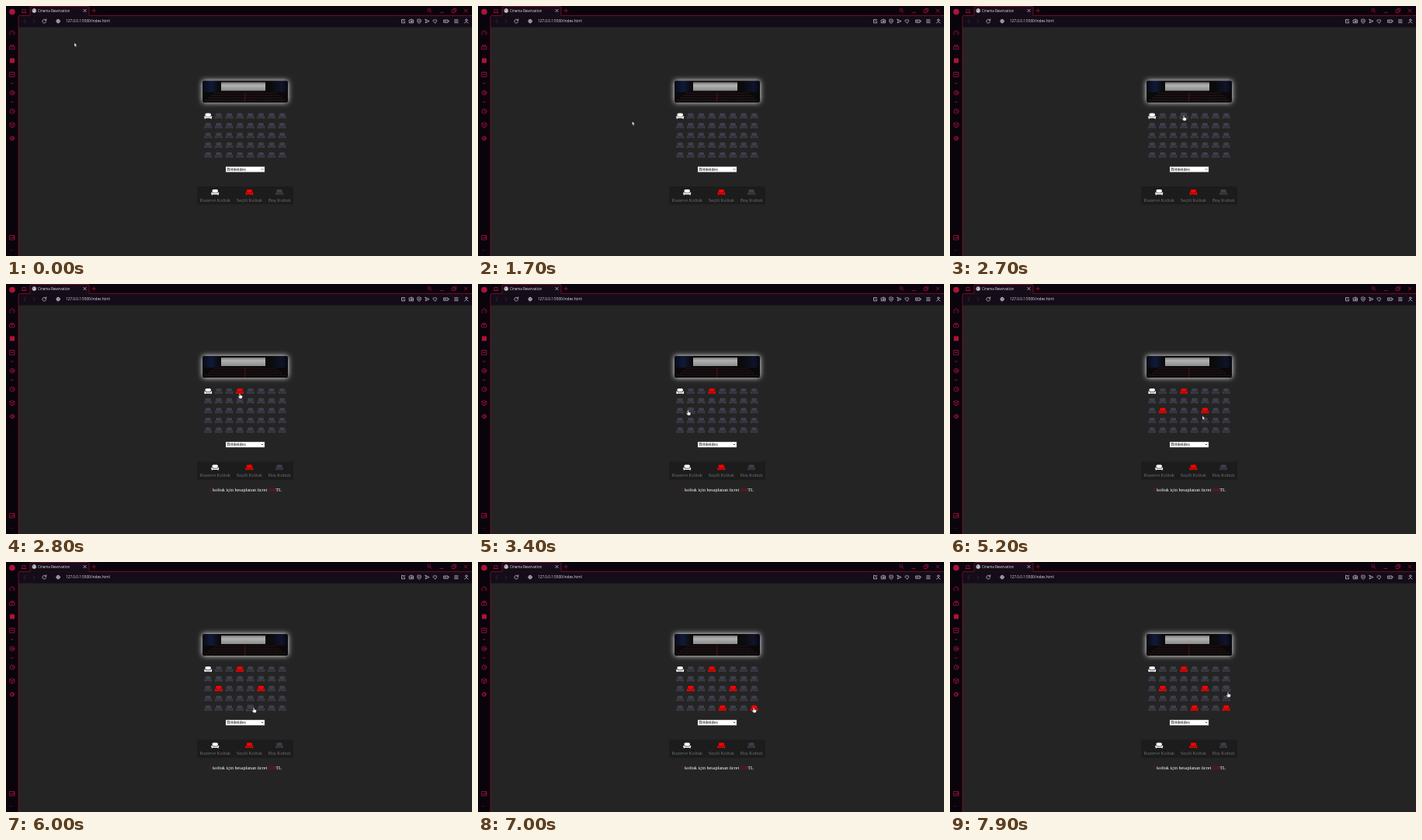
These frames come from a looping animation (600x323 px, 8 s). An HTML page:

```html
<!DOCTYPE html>
<html lang="tr">
<head>
<meta charset="utf-8">
<title>Cinema Reservation</title>
<style>
html, body { margin: 0; height: 100%; overflow: hidden; background: #242424; }
svg { display: block; width: 100vw; height: 100vh; }
.ui { font-family: "Open Sans", "Noto Sans", sans-serif; fill: #e4e0e6; }
.serif { font-family: "Liberation Serif", "Times New Roman", serif; font-size: 6.25px; }
.line { fill: none; stroke-width: .8; stroke-linecap: round; stroke-linejoin: round; }
</style>
</head>
<body>
<svg viewBox="0 0 600 323">
  <defs>
    <path id="seat" d="M-3.7-.7V-2Q-3.7-3.6-2.1-3.6H2.1Q3.7-3.6 3.7-2V-.7Q2.8-.4 2.8.8H-2.8Q-2.8-.4-3.7-.7ZM-5.2.9A1.1 1.1 0 0 1-3.3.5V1.5H3.3V.5A1.1 1.1 0 0 1 5.2.9L4.6 2V3.6H3.3V3H-3.3V3.6H-4.6V2Z"/>
    <filter id="glow" x="-20%" y="-70%" width="140%" height="240%"><feGaussianBlur stdDeviation="3.6"/></filter>
    <linearGradient id="beam" x2="0" y2="1">
      <stop stop-color="#777"/><stop offset=".35" stop-color="#b2b2b2"/><stop offset="1" stop-color="#8c8c8c"/>
    </linearGradient>
    <linearGradient id="wall">
      <stop stop-color="#080a14"/><stop offset=".1" stop-color="#101a38"/><stop offset=".2" stop-color="#0b0a0c"/>
      <stop offset=".8" stop-color="#0b0a0c"/><stop offset=".93" stop-color="#10142a"/><stop offset="1" stop-color="#080810"/>
    </linearGradient>
  </defs>

  <rect width="600" height="323" fill="#242424"/>
  <rect width="600" height="12.5" fill="#09040c"/>
  <rect width="16" height="323" fill="#09040c"/>
  <rect x="16" y="12.5" width="584" height="15" fill="#140c18"/>
  <path d="M31 12V2Q31 .5 32.5.5H105.500Q107 .5 107 2V12" fill="#160c19"/>
  <path class="line" stroke="#8a0f2c" d="M16 323V14Q16 12.300 18 12.300H31V2Q31 .5 32.500.5H105.500Q107 .5 107 2V12.300H600"/>

  <g class="ui">
    <text x="41" y="7.800" font-size="4.450">Cinema Reservation</text>
    <text x="77" y="21.300" font-size="4.700">127.0.0.1:5500/index.html</text>
  </g>

  <!-- tab strip and sidebar -->
  <circle cx="8" cy="7.500" r="3.800" fill="#b0123a"/>
  <rect x="5" y="67.500" width="6" height="6" fill="#b0123a"/>
  <g class="line" stroke="#a51236">
    <path d="M21 8V4.500H25V8ZM20 8.500H26M111 6H115.500M113.250 3.750V8.250"/>
    <circle cx="544.700" cy="5.200" r="1.900"/>
    <path d="M546.200 6.700 548 8.500M559 8.500H563M574.500 5H578V8.500H574.500ZM576 5V3.500H579.500V7H578M590 4 594 8M594 4 590 8"/>
    <path d="M5.800 37.600A3.200 3.200 0 1 1 10.200 37.600M8 35.500 9.800 33.800M5 52H11V56H5ZM6.500 52V50.500H9.500V52M8 53V55"/>
    <path d="M5 85.500H11V91.500H5ZM6.500 88.500H9.500M6.800 87H7M9 87H9.200M6.500 100H9.500M6.500 124H9.500"/>
    <circle cx="8" cy="112" r="3"/><circle cx="8" cy="112" r="1.200"/>
    <circle cx="8" cy="136" r="3"/><path d="M8 134V136L9.500 137"/>
    <path d="M8 150.500 11 152V155.500L8 157 5 155.500V152ZM5 152 8 153.500 11 152M8 153.500V157"/>
    <circle cx="8" cy="171" r="2.500" stroke-width="1.300" stroke-dasharray="1.300 .660" stroke-linecap="butt"/><circle cx="8" cy="171" r="1.500"/>
    <path d="M5 296.500H11V302H5ZM5.500 301 7.500 299 9 300.500"/><circle cx="9.500" cy="299" r=".9"/>
    <path d="M5.500 315.500H10.500" stroke-dasharray=".1 2.400"/>
  </g>

  <!-- address bar -->
  <g class="line" stroke="#3c3341"><path d="M25 17.500 23 19.700 25 22M35 17.500 37 19.700 35 22"/></g>
  <g class="line" stroke="#c4bec8" stroke-width=".7">
    <path d="M99.800 4.300 103.200 7.700M103.200 4.300 99.800 7.700M51.300 18.300A2.400 2.400 0 1 0 51.700 20M51.800 16.800V18.600H50"/>
    <circle cx="67.200" cy="19.600" r="2.300"/><path d="M65 19.600H69.400M67.200 17.300Q65 19.600 67.200 21.900Q69.400 19.600 67.200 17.300"/>
    <path d="M512 17.500H509.500V21.800H513.500V20M511.500 19.800 513.800 17.300M519.500 18H520.500L521 17.200H523L523.500 18H524.500V21.800H519.500Z"/>
    <circle cx="522" cy="19.800" r="1"/>
    <path d="M532 17 534.200 17.800V20Q534 21.500 532 22.300Q530 21.500 529.800 20V17.800ZM531.200 19.500H532.800M540 17.400 545 19.600 540 21.800 541 19.600Z"/>
    <path d="M552.300 22 550.200 19.800Q549.500 18.200 550.800 17.600Q551.900 17.400 552.300 18.500Q552.700 17.400 553.800 17.600Q555.100 18.200 554.400 19.800Z"/>
    <path d="M564 18H569V21.300H564ZM565 19.700H566.500M570 19V20.300M577.500 17.800H582M577.500 19.700H582M577.500 21.600H582"/>
    <circle cx="592.700" cy="18.200" r="1.200"/><path d="M590.600 22Q592.700 18.500 594.800 22"/>
  </g>
  <circle cx="36.300" cy="6" r="2.700" fill="#eee"/>
  <path d="M34.300 4.700Q36 4.300 35.700 5.700T34.700 7M37 3.900Q36.500 5 38.300 5.400M36.700 7.700 37.900 6.600" class="line" stroke="#333"/>

  <g id="page">
    <rect x="253" y="93" width="110" height="28" rx="2" fill="#fff" filter="url(#glow)"/>
    <rect x="253" y="93" width="110" height="28" rx="2" fill="url(#wall)"/>
    <path d="M277 95H334V106H277Z" fill="url(#beam)"/>
    <path d="M254 108H362V121H254Z" fill="#0b0809"/>
    <g id="rows" fill="none"></g>
    <path d="M308 109 307.500 121" stroke="#4b1014" stroke-width="1.200"/>
    <g id="seats"></g>
    <rect x="283" y="204" width="50" height="7" fill="#fff" stroke="#777" stroke-width=".4"/>
    <text x="284.800" y="209.300" font-size="5.150" font-family="Liberation Sans, Arial, sans-serif" fill="#111">Brittletides</text>
    <path class="line" stroke="#333" stroke-width=".6" d="M329 207 330 208 331 207"/>
    <rect x="246" y="229.500" width="124" height="23.500" rx="1" fill="#1c1c1c"/>
    <g id="legend" class="serif" fill="#6f6f6f" text-anchor="middle"></g>
  </g>
  <text id="message" class="serif" x="308" y="268.300" text-anchor="middle" fill="#fff"><tspan id="count" fill="#b8000f"></tspan> koltuk için hesaplanan ücret <tspan id="price" fill="#b8000f"></tspan>TL</text>
  <g id="cursor" fill="#fff" stroke="#111" stroke-width=".4" stroke-linejoin="round">
    <path id="arrow" d="M0 0V5L1.150 3.900 2 5.800 2.800 5.400 2 3.600H3.500Z"/>
    <path id="hand" d="M-.7.5Q0-.4.7.5V2.400L3 3Q3.600 3.300 3.400 4.400L2.800 6.800H-.4L-2.200 4.200Q-2.100 3.300-1.400 3.700L-.7 4.300Z"/>
  </g>
</svg>
<script>
const $ = id => document.getElementById(id);
const EMPTY = '#3e3e4c', TAKEN = '#fff', CHOSEN = '#f00';
const LOOP = 8000, SHIFT = 3.6, PRICE = 100;

// time, x, y of the pointer tip
const path = [
  [0, 88, 47.5], [1700, 198.500, 149], [2700, 301, 141.500], [2850, 301, 141],
  [3400, 270.500, 163], [3650, 271.500, 163], [4500, 327, 164], [4800, 327, 164],
  [6000, 319, 188], [6200, 318, 188], [6800, 355, 188], [7100, 355, 188], [7900, 358, 168]
];
// time, row, column of each chosen seat
const clicks = [[2800, 0, 3], [3600, 2, 1], [4700, 2, 5], [6100, 4, 4], [6900, 4, 7]];

const seats = [];
const use = (x, y, fill) => `<use href="#seat" transform="translate(${x} ${y})" fill="${fill}"/>`;
for (let row = 0; row < 5; row++)
  for (let col = 0; col < 8; col++)
    seats.push({ row, col, x: 260.2 + col * 13.63, y: 138.5 + row * 12.6 });
$('seats').innerHTML = seats.map(s => use(s.x, s.y, EMPTY)).join('');
seats.forEach((s, i) => s.el = $('seats').children[i]);

$('legend').innerHTML = [[269.2, 'Razerve Koltuk', TAKEN], [313.4, 'Seçili Koltuk', CHOSEN], [352, 'Boş Koltuk', EMPTY]]
  .map(([x, label, fill]) => use(x, 237, fill) + `<text x="${x}" y="249.300">${label}</text>`).join('');

$('rows').innerHTML = [0, 1, 2, 3].map(i =>
  `<path d="M${268 - i * 4} ${109 + i * 3}H${348 + i * 4}" stroke="#29191b" stroke-width="1.100" stroke-dasharray="${2 + i * .5} .700"/>`).join('');

function pointer(t) {
  let i = path.findIndex(p => p[0] > t);
  if (i < 0) return path.at(-1).slice(1);
  const [t0, x0, y0] = path[i - 1], [t1, x1, y1] = path[i];
  let k = (t - t0) / (t1 - t0);
  k = k * k * (3 - 2 * k);
  return [x0 + (x1 - x0) * k, y0 + (y1 - y0) * k];
}

function draw(now) {
  const t = now % LOOP;
  const done = clicks.filter(c => t >= c[0]);
  const dy = done.length ? 0 : SHIFT;
  const [x, y] = pointer(t);
  let overSeat = false;

  for (const s of seats) {
    const taken = !s.row && !s.col;
    const chosen = done.some(c => c[1] === s.row && c[2] === s.col);
    const over = !taken && Math.abs(x - s.x) < 5.5 && Math.abs(y - s.y - dy) < 4.8;
    overSeat ||= over;
    s.el.setAttribute('fill', taken ? TAKEN : chosen ? CHOSEN : EMPTY);
    s.el.setAttribute('transform', `translate(${s.x} ${s.y}) scale(${over && !chosen ? 1.2 : 1})`);
  }

  $('page').setAttribute('transform', `translate(0 ${dy})`);
  $('message').style.display = done.length ? '' : 'none';
  $('count').textContent = done.length;
  $('price').textContent = done.length * PRICE;
  $('cursor').setAttribute('transform', `translate(${x} ${y})`);
  $('arrow').style.display = overSeat ? 'none' : '';
  $('hand').style.display = overSeat ? '' : 'none';
}

const start = performance.now();
function tick() {
  draw(performance.now() - start);
  requestAnimationFrame(tick);
}
tick();
</script>
</body>
</html>
```
